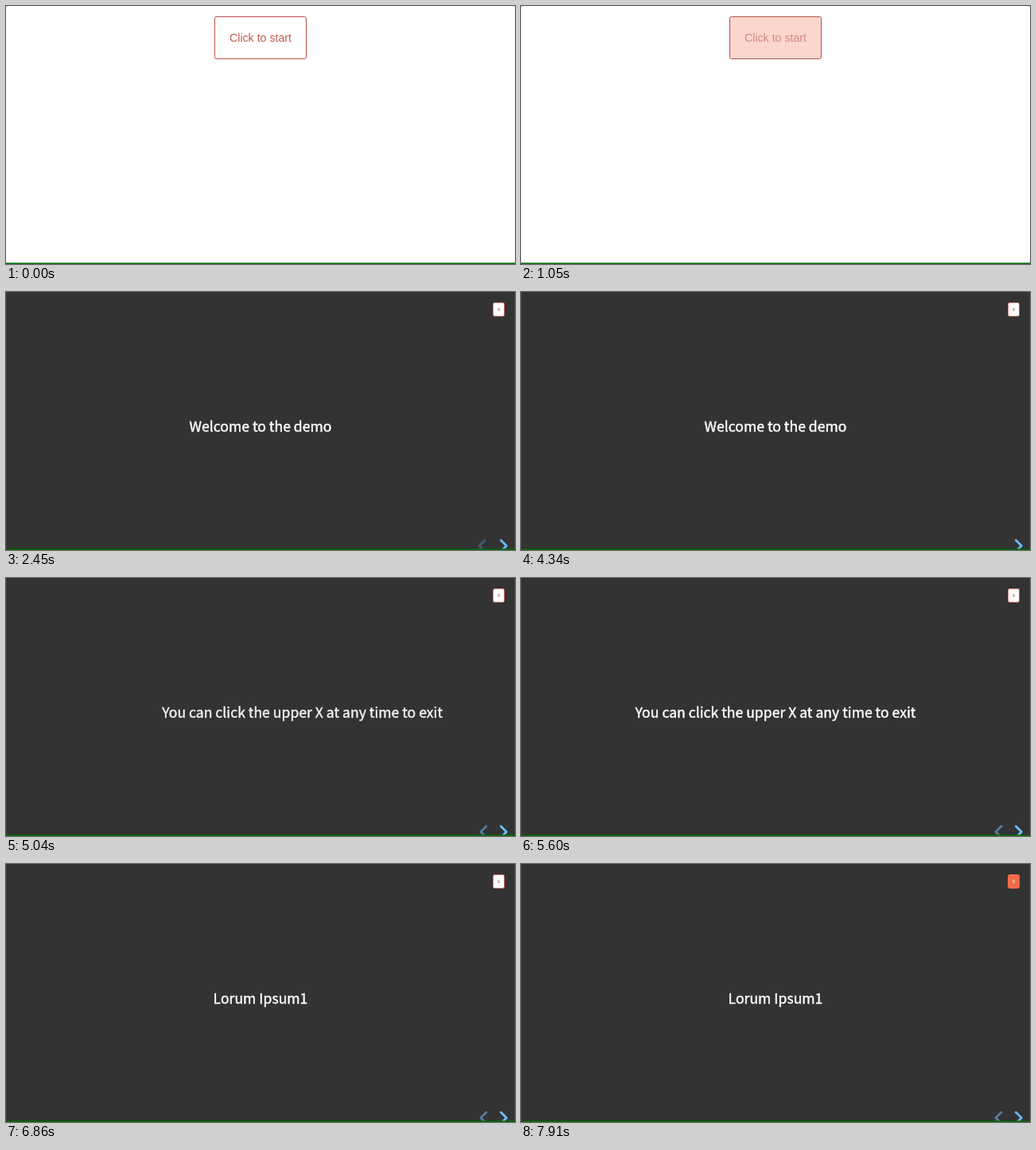
An HTML page with a canvas for the animation above (8 s loop, 640 by 325 pixels).

```html
<!DOCTYPE html>
<html lang="en">
<head>
<meta charset="utf-8">
<title>Slide demo</title>
<style>
  html, body { margin: 0; width: 100%; height: 100%; overflow: hidden; background: #fff; }
  canvas { display: block; width: 640px; height: 325px; }
</style>
</head>
<body>
<canvas id="stage" width="640" height="325"></canvas>
<script>
const ctx = document.getElementById('stage').getContext('2d');
const LOOP = 8000, W = 640, H = 325;
const SLIDES_AT = 2440;
const SLIDE_MS = 900, SLIDE_SHIFT = 705;
const SLIDE_FONT = '17.6px "Noto Sans CJK JP", "Noto Sans CJK SC", "Noto Sans CJK", sans-serif';
const UI_FONT = '"Liberation Sans", Arial, sans-serif';
const RED = [184, 80, 70], ORANGE = [240, 108, 72], WHITE = [255, 255, 255];

const slides = [
  { text: 'Welcome to the demo', from: -Infinity, to: 4546 },
  { text: 'You can click the upper X at any time to exit', from: 4546, to: 5909 },
  { text: 'Lorum Ipsum1', from: 5909, to: Infinity }
];

const clamp = v => Math.max(0, Math.min(1, v));
const ramp = (t, start, end) => clamp((t - start) / (end - start));
const easeOut = v => 1 - (1 - v) ** 2;
const smooth = v => v * v * (3 - 2 * v);
const mix = (a, b, k) => `rgb(${a.map((v, i) => Math.round(v + (b[i] - v) * k)).join()})`;

function bezier(x1, y1, x2, y2) {
  const at = (a, b, s) => 3 * a * s * (1 - s) ** 2 + 3 * b * s * s * (1 - s) + s ** 3;
  return x => {
    if (x <= 0 || x >= 1) return clamp(x);
    let low = 0, high = 1;
    for (let i = 0; i < 24; i++) {
      const mid = (low + high) / 2;
      if (at(x1, x2, mid) < x) low = mid; else high = mid;
    }
    return at(y1, y2, low);
  };
}
const slideEase = bezier(0.26, 0.86, 0.44, 0.985);

// weight thickens the glyphs by a thin outline, in pixels.
function label(text, x, y, font, color, weight = 0) {
  ctx.font = font;
  ctx.fillStyle = ctx.strokeStyle = color;
  ctx.textAlign = 'center';
  ctx.textBaseline = 'alphabetic';
  ctx.fillText(text, x, y);
  if (!weight) return;
  ctx.lineWidth = weight;
  ctx.lineJoin = 'round';
  ctx.strokeText(text, x, y);
}

function button(x, y, w, h, radius, hover, border) {
  ctx.beginPath();
  ctx.roundRect(x, y, w, h, radius);
  ctx.fillStyle = mix(WHITE, ORANGE, hover);
  ctx.fill();
  ctx.strokeStyle = border;
  ctx.lineWidth = 1;
  ctx.stroke();
}

function startScreen(t) {
  ctx.fillStyle = '#fff';
  ctx.fillRect(0, 0, W, H);
  ctx.fillStyle = '#ccc';
  for (const x of [0, W - 2]) ctx.fillRect(x, 0, 2, 1);

  const hover = smooth(ramp(t, 940, 1260));
  const settle = ramp(t, 1350, 1540);
  button(262.5, 13.5, 115, 53, 2, hover, mix(RED, [222, 98, 68], settle));
  label('Click to start', 320, 45, '14.2px ' + UI_FONT, mix([190, 92, 80], WHITE, hover));
}

function slideText({ text, from, to }, t) {
  const enter = slideEase((t - from) / SLIDE_MS);
  const leave = slideEase((t - to) / SLIDE_MS);
  const opacity = enter * (1 - leave);
  if (opacity <= 0) return;
  ctx.globalAlpha = opacity;
  label(text, 320 + SLIDE_SHIFT * (1 - enter - leave), 176, SLIDE_FONT, '#fff', 0.45);
  ctx.globalAlpha = 1;
}

// dir is 1 for a right chevron, -1 for a left one.
function chevron(tipX, dir, opacity) {
  if (opacity <= 0) return;
  ctx.globalAlpha = opacity;
  ctx.strokeStyle = '#6cc0fc';
  ctx.lineWidth = 2.8;
  ctx.lineCap = ctx.lineJoin = 'round';
  ctx.beginPath();
  ctx.moveTo(tipX - 7 * dir, 312.8);
  ctx.lineTo(tipX, 319.8);
  ctx.lineTo(tipX - 7 * dir, 326.8);
  ctx.stroke();
  ctx.globalAlpha = 1;
}

function bounce(t) {
  const right = easeOut(ramp(t, 2620, 2800)) - easeOut(ramp(t, 2800, 2900));
  const left = easeOut(ramp(t, 2950, 3060)) - easeOut(ramp(t, 3060, 3220));
  return 4.2 * right - 2.6 * left;
}

function slideScreen(t) {
  ctx.fillStyle = '#333';
  ctx.fillRect(0, 0, W, H);
  ctx.fillStyle = '#3e3e3e';
  for (const x of [0, W - 1]) ctx.fillRect(x, 0, 1, H);
  slides.forEach(slide => slideText(slide, t));

  const hover = smooth(ramp(t, 7700, 7900));
  button(612.5, 13.5, 14, 17, 2, hover, mix([212, 112, 102], ORANGE, hover));
  label('x', 619.5, 24, '7px ' + UI_FONT, mix([170, 85, 75], WHITE, hover));

  const shown = t < 4500 ? 1 - ramp(t, 2400, 2515) : ramp(t, 4540, 4740);
  chevron(596.9 - 4 * (1 - shown), -1, 0.53 * shown);
  const active = ramp(t, 4300, 4410) - ramp(t, 7100, 7140);
  chevron(629.3 + bounce(t), 1, 0.94 + 0.06 * active);
}

function draw(now) {
  const t = now % LOOP;
  if (t < SLIDES_AT) startScreen(t); else slideScreen(t);
  ctx.fillStyle = 'rgba(4, 108, 4, 0.6)';
  ctx.fillRect(0, 323, W, 1);
  ctx.fillStyle = 'rgb(4, 108, 4)';
  ctx.fillRect(0, 324, W, 1);
}

const begin = performance.now();
function frame() {
  draw(performance.now() - begin);
  requestAnimationFrame(frame);
}
frame();
</script>
</body>
</html>
```
